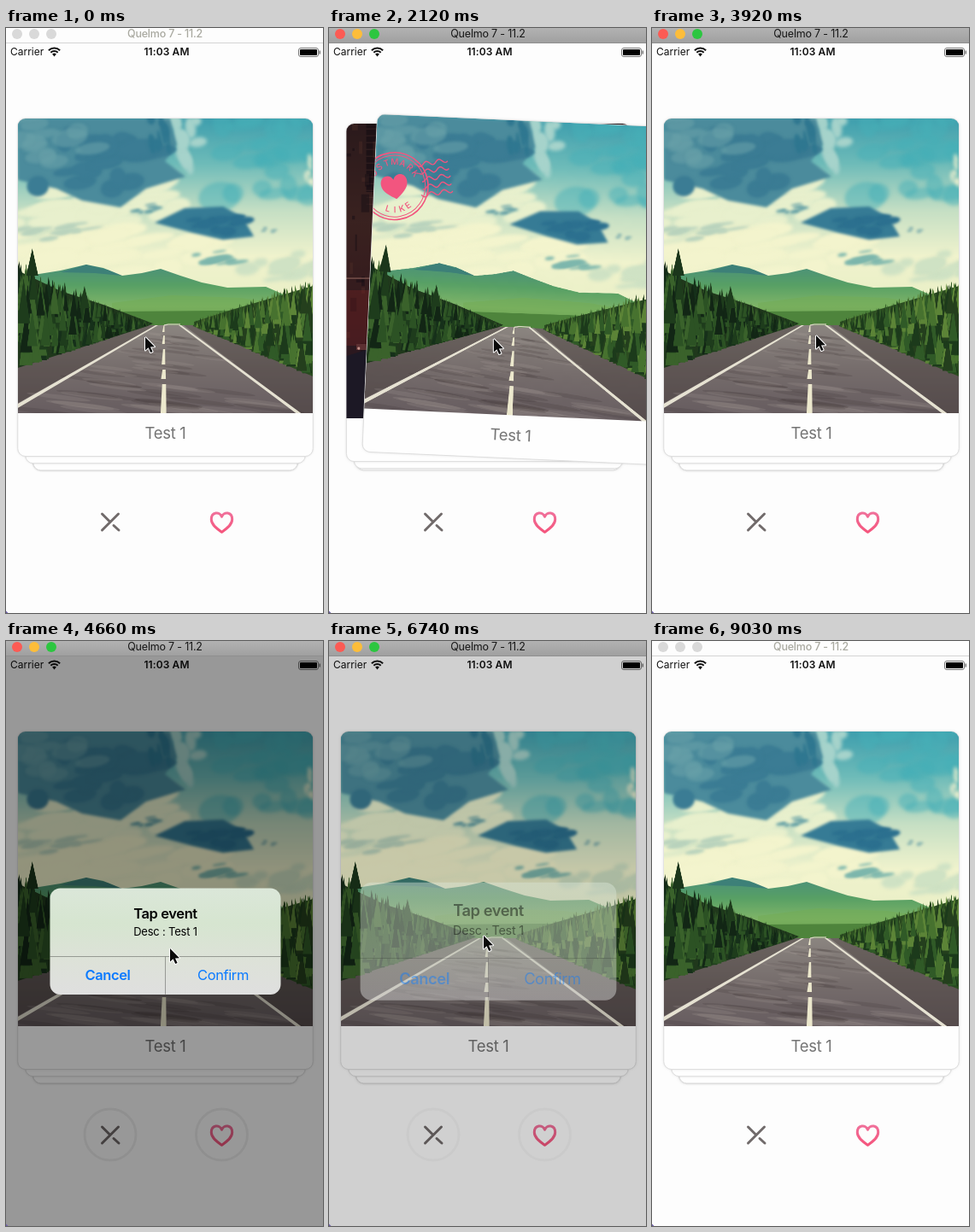
Animation, 371 px wide and 685 px high, one loop 9.09 s. Source, as an HTML page with a canvas:

```html
<!DOCTYPE html>
<html lang="en">
<head>
<meta charset="utf-8">
<title>Card deck</title>
<style>
  html, body { margin: 0; width: 100%; height: 100%; overflow: hidden; background: #fdfdfd; }
  canvas { display: block; width: 371px; height: 685px; }
</style>
</head>
<body>
<canvas id="stage"></canvas>
<script>
const W = 371, H = 685, LOOP = 9090;
const CARD = { w: 345.5, h: 395.5, cx: 186.5, cy: 303.75, photo: 345 };
const FONT = 'Inter, "Liberation Sans", sans-serif';
const PINK = '#f2557f', GRAY = '#716b6b', BLUE = '#0a7aff';
const canvas = document.getElementById('stage');
const dpr = window.devicePixelRatio || 1;
canvas.width = W * dpr;
canvas.height = H * dpr;
const ctx = canvas.getContext('2d');

// Motion: [time, ...values] keys joined by monotone curves
const POSE = [ // dx, dy, degrees
  [540, 0, 0, 0], [1400, 87, 6.4, 5], [1580, 94, 7, 5.4], [1760, 94, 7, 5.4],
  [2120, 34, 2.5, 2.6], [2640, -33, 2, -2], [2680, -33, 2, -2],
  [2880, -2, 0, -.1], [2960, 2.5, -.6, .25], [3000, 1.5, -.5, .2], [3200, 0, 0, 0]
];
const CURSOR = [
  [540, 163, 362], [1400, 266, 371], [1580, 271, 372], [1760, 271, 372],
  [2120, 193, 364], [2640, 139, 368], [3050, 139, 368], [3540, 243, 546],
  [3920, 192, 360], [4930, 192, 360], [5220, 243, 394], [5750, 243, 394],
  [6290, 181, 345], [6880, 181, 345], [7250, 243, 394], [8050, 243, 394], [8680, 225, 705]
];
const LIKE = [[600, 0], [850, 1], [2150, 1], [2350, 0]];
const DISLIKE = [[2400, 0], [2580, 1], [2720, 1], [3000, .15], [3130, 0]];
const ALERTS = [[4280, 5670], [6740, 7850]];

function track(keys, t) {
  const last = keys.length - 1;
  if (t <= keys[0][0]) return keys[0].slice(1);
  if (t >= keys[last][0]) return keys[last].slice(1);
  const i = keys.findIndex(k => k[0] > t) - 1;
  const a = keys[i], b = keys[i + 1], span = b[0] - a[0], u = (t - a[0]) / span;
  const slope = (j, c) => (keys[j + 1][c] - keys[j][c]) / (keys[j + 1][0] - keys[j][0]);
  const tangent = (j, c) => {
    if (j === 0 || j === last) return 0;
    const p = slope(j - 1, c), q = slope(j, c);
    return p * q <= 0 ? 0 : 2 * p * q / (p + q);
  };
  return a.slice(1).map((v, n) => {
    const c = n + 1, u2 = u * u, u3 = u2 * u;
    return v * (2 * u3 - 3 * u2 + 1) + b[c] * (3 * u2 - 2 * u3) +
      span * (tangent(i, c) * (u3 - 2 * u2 + u) + tangent(i + 1, c) * (u3 - u2));
  });
}

function alertState(t) {
  for (const [open, close] of ALERTS) {
    if (t < open || t > close + 300) continue;
    if (t >= close) return { p: 1 - (t - close) / 300, scale: 1 };
    const k = (t - open + 75) / 50;
    const p = 1 - (1 + k) * Math.exp(-k);
    return { p, scale: 1.2 - .2 * p };
  }
  return { p: 0, scale: 1 };
}

// Drawing helpers
function seeded(s) {
  return () => (s = (s * 16807) % 2147483647) / 2147483647;
}

function poly(g, pts, fill) {
  g.beginPath();
  pts.forEach(([x, y]) => g.lineTo(x, y));
  g.closePath();
  g.fillStyle = fill;
  g.fill();
}

function line(g, pts, color, width) {
  g.beginPath();
  pts.forEach(([x, y], i) => i ? g.lineTo(x, y) : g.moveTo(x, y));
  g.strokeStyle = color;
  g.lineWidth = width;
  g.stroke();
}

function disc(g, x, y, r, fill) {
  g.beginPath();
  g.arc(x, y, r, 0, 7);
  g.fillStyle = fill;
  g.fill();
}

function ramp(g, y0, y1, ...colors) {
  const grad = g.createLinearGradient(0, y0, 0, y1);
  colors.forEach((c, i) => grad.addColorStop(i / (colors.length - 1), c));
  return grad;
}

function box(x, y, w, h, r) {
  ctx.beginPath();
  ctx.roundRect(x, y, w, h, r);
}

function text(s, x, y, size, color, weight = 400, gap = 0, align = 'center') {
  ctx.font = `${weight} ${size}px ${FONT}`;
  ctx.letterSpacing = gap + 'px';
  ctx.textAlign = align;
  ctx.textBaseline = 'middle';
  ctx.fillStyle = color;
  ctx.fillText(s, x, y);
  ctx.letterSpacing = '0px';
}

function heart(x, y, s) {
  const c = (...v) => ctx.bezierCurveTo(...v.map((n, i) => (i % 2 ? y : x) + n * s));
  ctx.beginPath();
  ctx.moveTo(x, y + .92 * s);
  c(-.4, .65, -1, .25, -1, -.3);
  c(-1, -1, -.2, -1.1, 0, -.55);
  c(.2, -1.1, 1, -1, 1, -.3);
  c(1, .25, .4, .65, 0, .92);
  ctx.closePath();
}

function cross(x, y, k, color, width) {
  ctx.lineCap = 'round';
  line(ctx, [[x + 9.5 * k, y - 9.5 * k], [x - 9.5 * k, y + 9.5 * k]], color, width);
  line(ctx, [[x - 9.5 * k, y - 9.5 * k], [x - k, y - k]], color, width);
  line(ctx, [[x + 4 * k, y + 4 * k], [x + 10 * k, y + 9.5 * k]], color, width);
  ctx.lineCap = 'butt';
}

// Pictures
function picture(paint) {
  const c = document.createElement('canvas');
  c.width = c.height = CARD.photo * 2;
  const g = c.getContext('2d');
  g.scale(2, 2);
  paint(g);
  return c;
}

function cloud(g, rnd, n, cx, cy, rx, ry, color) {
  g.fillStyle = color;
  for (let i = 0; i < n; i++) {
    const x = cx + (rnd() + rnd() - 1) * rx, y = cy + (rnd() + rnd() - 1) * ry;
    g.beginPath();
    g.ellipse(x, y, rx * (.1 + .2 * rnd()), ry * (.1 + .2 * rnd()), -.15, 0, 7);
    g.fill();
  }
}

function forest(g, rnd, x0, x1, top, base, colors) {
  for (let i = 0; i < 330; i++) {
    const x = x0 + (x1 - x0) * rnd(), b = base(x), t = top(x);
    const depth = rnd() ** 1.6, y = t + (b - t) * depth * .8 - rnd() * (b - t) * .08;
    const w = 1.5 + (b - t) * .035 * (.6 + rnd());
    poly(g, [[x, y], [x + w, Math.min(b, y + w * 7)], [x - w, Math.min(b, y + w * 7)]],
      colors[Math.floor(rnd() * colors.length)]);
  }
}

const road = picture(g => {
  const rnd = seeded(41);
  g.fillStyle = ramp(g, 0, 215, '#3f9fae', '#6fbcb9', '#c5dfc4', '#f0f3cd', '#e9efc6');
  g.fillRect(0, 0, 345, 345);
  g.filter = 'blur(4px)';
  cloud(g, rnd, 26, 290, 45, 90, 60, 'rgba(70,176,184,.5)');
  cloud(g, rnd, 30, 70, 105, 130, 38, '#e8f0cd');
  cloud(g, rnd, 26, 110, 155, 160, 34, '#f3f4cd');
  cloud(g, rnd, 16, 190, 25, 36, 45, '#a6d3cb');
  cloud(g, rnd, 14, 320, 175, 60, 26, '#cfe2c4');
  cloud(g, rnd, 6, 345, 65, 14, 24, '#eef0d0');
  g.filter = 'blur(3px)';
  poly(g, [[0, 0], [178, 0], [186, 30], [172, 50], [196, 68], [150, 82], [120, 104],
    [75, 96], [45, 82], [0, 72]], '#4b8b9c');
  cloud(g, rnd, 26, 105, 48, 85, 44, '#3b7c94');
  cloud(g, rnd, 18, 40, 20, 70, 40, 'rgba(104,160,168,.6)');
  cloud(g, rnd, 10, 170, 25, 20, 40, '#2f7790');
  poly(g, [[160, 122], [195, 105], [240, 103], [262, 115], [276, 138], [240, 142], [205, 134]], '#367b95');
  cloud(g, rnd, 14, 230, 122, 42, 18, '#2c708f');
  cloud(g, rnd, 8, 150, 106, 24, 8, '#5a9aa3');
  cloud(g, rnd, 12, 230, 166, 50, 12, '#7db7ad');
  cloud(g, rnd, 12, 40, 132, 70, 12, '#b9d3bd');
  cloud(g, rnd, 5, 292, 129, 14, 4, '#5c98a4');
  g.filter = 'none';

  poly(g, [[0, 186], [50, 178], [80, 171], [100, 175], [122, 184], [145, 181], [167, 176], [190, 184],
    [215, 192], [245, 198], [290, 197], [320, 210], [345, 213], [345, 250], [0, 250]],
    ramp(g, 170, 245, '#4a8f7c', '#58a065', '#80b568', '#568a43'));
  poly(g, [[50, 180], [80, 171], [105, 177], [122, 184], [90, 181]], '#3d8078');
  poly(g, [[110, 216], [180, 207], [260, 210], [345, 222], [345, 245], [110, 245]], 'rgba(115,172,88,.6)');
  poly(g, [[120, 226], [345, 224], [345, 250], [120, 250]], '#4e843c');

  poly(g, [[0, 291], [152, 242], [208, 242], [345, 301], [345, 345], [0, 345]],
    ramp(g, 242, 345, '#8b8580', '#766d6c', '#675d60'));
  poly(g, [[0, 291], [152, 242], [163, 242], [0, 333]], 'rgba(62,53,52,.42)');
  poly(g, [[194, 242], [208, 242], [345, 301], [345, 345], [330, 345]], 'rgba(62,53,52,.42)');
  for (let i = 0; i < 60; i++) {
    const y = 250 + 94 * rnd(), half = (y - 240) * 1.45, x = 171 + (rnd() * 2 - 1) * half;
    g.fillStyle = i % 2 ? 'rgba(60,50,54,.2)' : 'rgba(165,153,150,.2)';
    g.beginPath();
    g.ellipse(x, y, 10 + half * .22, 1 + (y - 240) * .018, .12, 0, 7);
    g.fill();
  }

  const leftTop = x => 170 + 70 * (x / 158) ** .9, leftBase = x => 292 - 50 * x / 152;
  const rightTop = x => 236 - 44 * (x - 206) / 139, rightBase = x => 243 + 58 * (x - 206) / 139;
  poly(g, [[0, 178], [50, 202], [100, 218], [158, 240], [152, 243], [0, 292]], '#20381c');
  poly(g, [[206, 238], [250, 224], [345, 196], [345, 302], [206, 243]], '#2c4d21');
  forest(g, rnd, 0, 158, leftTop, leftBase, ['#16301a', '#1e3c1c', '#2c5224', '#3a622b', '#122615']);
  forest(g, rnd, 206, 345, rightTop, rightBase, ['#1c3a1b', '#305a27', '#47722f', '#5c8437', '#243f1d']);
  poly(g, [[17, 152], [24, 184], [10, 184]], '#1b361b');
  poly(g, [[78, 196], [84, 222], [72, 222]], '#1e3c1c');

  poly(g, [[161, 242], [164, 242], [0, 339], [0, 334]], '#e6e2d2');
  poly(g, [[188, 242], [191, 242], [331, 345], [325, 345]], '#e6e2d2');
  for (const [y, h] of [[242, 8], [254, 10], [270, 18], [294, 11], [311, 34]]) {
    const w = (y - 225) * .026;
    poly(g, [[171 - w, y], [171 + w, y], [171 + w * 1.15, y + h], [169.5 - w * 1.15, y + h]], '#ece8cd');
  }
  line(g, [[171, 242], [176, 241], [190, 241]], '#ddd8c8', 1.2);
});

const city = picture(g => {
  const rnd = seeded(7);
  g.fillStyle = ramp(g, 0, 345, '#2b1a1c', '#3a2220', '#33191d', '#1b1725');
  g.fillRect(0, 0, 345, 345);
  g.fillStyle = '#1d1115';
  g.fillRect(24, 0, 321, 80);
  for (let i = 0; i < 12; i++) line(g, [[24, 6 + i * 8], [345, 2 + i * 9]], 'rgba(110,72,66,.4)', .8);
  for (let i = 0; i < 90; i++) {
    g.fillStyle = i % 2 ? 'rgba(18,13,19,.45)' : 'rgba(96,58,44,.25)';
    g.fillRect(rnd() * 90, rnd() * 265, 2 + 8 * rnd(), 3 + 18 * rnd());
  }
  g.fillStyle = 'rgba(120,36,36,.35)';
  g.fillRect(0, 195, 100, 65);
  line(g, [[0, 181], [60, 181]], '#75504a', 1.5);
  g.filter = 'blur(3px)';
  disc(g, 112, 133, 53, '#7f2a2b');
  disc(g, 112, 133, 46, '#b43c37');
  g.filter = 'none';
  poly(g, [[0, 272], [90, 245], [345, 260], [345, 345], [0, 345]], '#1c1825');
  line(g, [[60, 85], [95, 115]], '#9b6560', 1);
  for (const [x, y] of [[52, 266], [60, 278], [12, 258]]) {
    g.fillStyle = '#5d3032';
    g.fillRect(x, y, 16, 7);
    disc(g, x + 3, y + 5, 1.6, '#c5918a');
  }
});

// Scene parts
function arcText(s, r, step, size, bottom) {
  [...s].forEach((ch, i) => {
    const a = (i - (s.length - 1) / 2) * step;
    ctx.save();
    ctx.rotate(bottom ? -a : a);
    text(ch, 0, bottom ? r : -r, size, ctx.strokeStyle, 500);
    ctx.restore();
  });
}

function stamp(x, a, side, word, color) {
  if (a <= .005) return;
  ctx.save();
  ctx.globalAlpha = a;
  ctx.translate(x, -114.5);
  ctx.scale(1.8 - .8 * a, 1.8 - .8 * a);
  ctx.rotate(-side * .21);
  ctx.strokeStyle = color;
  for (const [r, w] of [[39.3, 1.6], [36, 1]]) {
    ctx.beginPath();
    ctx.arc(0, 0, r, 0, 7);
    ctx.lineWidth = w;
    ctx.stroke();
  }
  arcText('POSTMARK', 28, .34, 10, false);
  arcText(word, 28, .3, 10, true);
  for (let y = -20; y <= 24; y += 9) {
    const pts = [];
    for (let d = Math.sqrt(1500 - y * y) - 6; d < 67; d++) pts.push([side * d, y + 2.4 * Math.sin(d * .42)]);
    line(ctx, pts, color, 1.4);
  }
  if (side > 0) {
    heart(0, 1, 15.5);
    ctx.fillStyle = color;
    ctx.fill();
  } else cross(0, 0, 1.1, color, 5);
  ctx.restore();
}

function card(slot, photo) {
  const inset = 9 * slot, w = CARD.w - 2 * inset;
  const x = -w / 2, y = -CARD.h / 2 + 8.2 * slot;
  ctx.save();
  box(x, y, w, CARD.h, 9);
  ctx.shadowColor = 'rgba(0,0,0,.14)';
  ctx.shadowBlur = 3 * dpr;
  ctx.fillStyle = '#fefefe';
  ctx.fill();
  ctx.shadowColor = 'transparent';
  ctx.strokeStyle = '#dedede';
  ctx.lineWidth = 1;
  ctx.stroke();
  ctx.clip();
  if (photo) ctx.drawImage(photo, x, y, w, CARD.photo);
  ctx.restore();
}

function deck(t) {
  const [dx, dy, deg] = track(POSE, t), lift = Math.min(1, Math.abs(deg) / 10);
  ctx.save();
  ctx.translate(CARD.cx, CARD.cy);
  card(2);
  card(2 - lift);
  card(1 - lift, city);
  ctx.translate(dx, dy);
  ctx.rotate(deg * Math.PI / 180);
  card(0, road);
  text('Test 1', 0, 171.5, 18.5, '#757575', 400, -.3);
  box(-CARD.w / 2, -CARD.h / 2, CARD.w, CARD.h, 9);
  ctx.clip();
  stamp(-149, track(LIKE, t)[0], 1, 'LIKE', PINK);
  stamp(159, track(DISLIKE, t)[0], -1, 'DISLIKE', '#6d7478');
  ctx.restore();
}

function buttons(dim) {
  for (const x of [122, 252.5]) {
    ctx.beginPath();
    ctx.arc(x, 578, 30, 0, 7);
    ctx.strokeStyle = `rgba(0,0,0,${.06 * dim})`;
    ctx.lineWidth = 3;
    ctx.stroke();
  }
  cross(122, 578.5, 1, GRAY, 3);
  heart(252.5, 579, 12.2);
  ctx.strokeStyle = ramp(ctx, 567, 591, '#f0709a', '#f5547c');
  ctx.lineWidth = 3;
  ctx.lineJoin = 'round';
  ctx.stroke();
}

function statusBar() {
  text('Carrier', 5, 28.5, 12, '#111', 400, 0, 'left');
  text('11:03 AM', 188, 28.5, 12, '#111', 600, .1);
  for (const r of [9.5, 6]) {
    ctx.beginPath();
    ctx.arc(56.5, 33, r, -2.34, -.8);
    ctx.strokeStyle = '#111';
    ctx.lineWidth = 2;
    ctx.stroke();
  }
  ctx.beginPath();
  ctx.moveTo(56.5, 33.5);
  ctx.arc(56.5, 33, 3.4, -2.34, -.8);
  ctx.fillStyle = '#111';
  ctx.fill();
  box(342.5, 23.5, 23, 10, 2.5);
  ctx.strokeStyle = '#777';
  ctx.lineWidth = 1;
  ctx.stroke();
  box(344, 25, 20, 7, 1);
  ctx.fillStyle = '#000';
  ctx.fill();
  ctx.fillStyle = '#777';
  ctx.fillRect(366.5, 26.5, 1.5, 4);
}

function titleBar(active) {
  ctx.fillStyle = active ? ramp(ctx, 0, 17, '#b2b2b2', '#a0a0a0') : '#fdfdfd';
  ctx.fillRect(0, 0, W, 18);
  ctx.fillStyle = active ? '#8f8f8f' : '#d4d4d4';
  ctx.fillRect(0, 17, W, 1);
  const lights = active ? ['#fc5b54', '#fdbd3a', '#2cc640'] : ['#d9d9d9', '#d9d9d9', '#d9d9d9'];
  lights.forEach((c, i) => disc(ctx, 13 + 20 * i, 7, 6, c));
  text('Quelmo 7 - 11.2', 186, 7.5, 12.5, active ? '#161616' : '#a9a9a0', active ? 400 : 500, -.2);
}

function alertBox({ p, scale }) {
  if (p <= 0) return;
  ctx.fillStyle = `rgba(0,0,0,${.4 * p})`;
  ctx.fillRect(0, 18, W, H - 18);
  ctx.save();
  ctx.globalAlpha = p;
  ctx.translate(186.5, 351.7);
  ctx.scale(scale, scale);
  box(-135, -62.2, 270, 124.4, 12);
  ctx.fillStyle = ramp(ctx, -62, 62, '#dbe7d9', '#d6e5d0', '#dde2d8', '#dfdfdf');
  ctx.fill();
  text('Tap event', 0, -31.5, 16.5, '#000', 600, -.4);
  text('Desc : Test 1', 0, -10.5, 13, '#000', 400, -.2);
  ctx.fillStyle = 'rgba(0,0,0,.4)';
  ctx.fillRect(-135, 17.5, 270, .8);
  ctx.fillRect(-.4, 18, .8, 44);
  text('Cancel', -67.5, 40.5, 16.5, BLUE, 600, -.4);
  text('Confirm', 67.5, 40.5, 16.5, BLUE, 400, -.4);
  ctx.restore();
}

function pointer(t) {
  const [x, y] = track(CURSOR, t);
  if (y > H) return;
  ctx.save();
  ctx.translate(x, y);
  const shape = [[0, 0], [0, 15.5], [3.6, 12.2], [6.2, 18], [8.6, 17], [6, 11.4], [11, 11.2]];
  ctx.lineJoin = 'round';
  line(ctx, [...shape, shape[0]], '#fff', 2);
  poly(ctx, shape, '#0a0a0a');
  ctx.restore();
}

function draw(t) {
  const active = t >= 210 && t < 9030, sheet = alertState(t);
  ctx.setTransform(dpr, 0, 0, dpr, 0, 0);
  ctx.fillStyle = '#fdfdfd';
  ctx.fillRect(0, 0, W, H);
  buttons(sheet.p);
  deck(t);
  statusBar();
  alertBox(sheet);
  titleBar(active);
  poly(ctx, [[0, 682.5], [2.5, 685], [0, 685]], '#6f5fae');
  pointer(t);
}

const start = performance.now();
function tick() {
  draw((performance.now() - start) % LOOP);
  requestAnimationFrame(tick);
}
tick();
</script>
</body>
</html>
```
